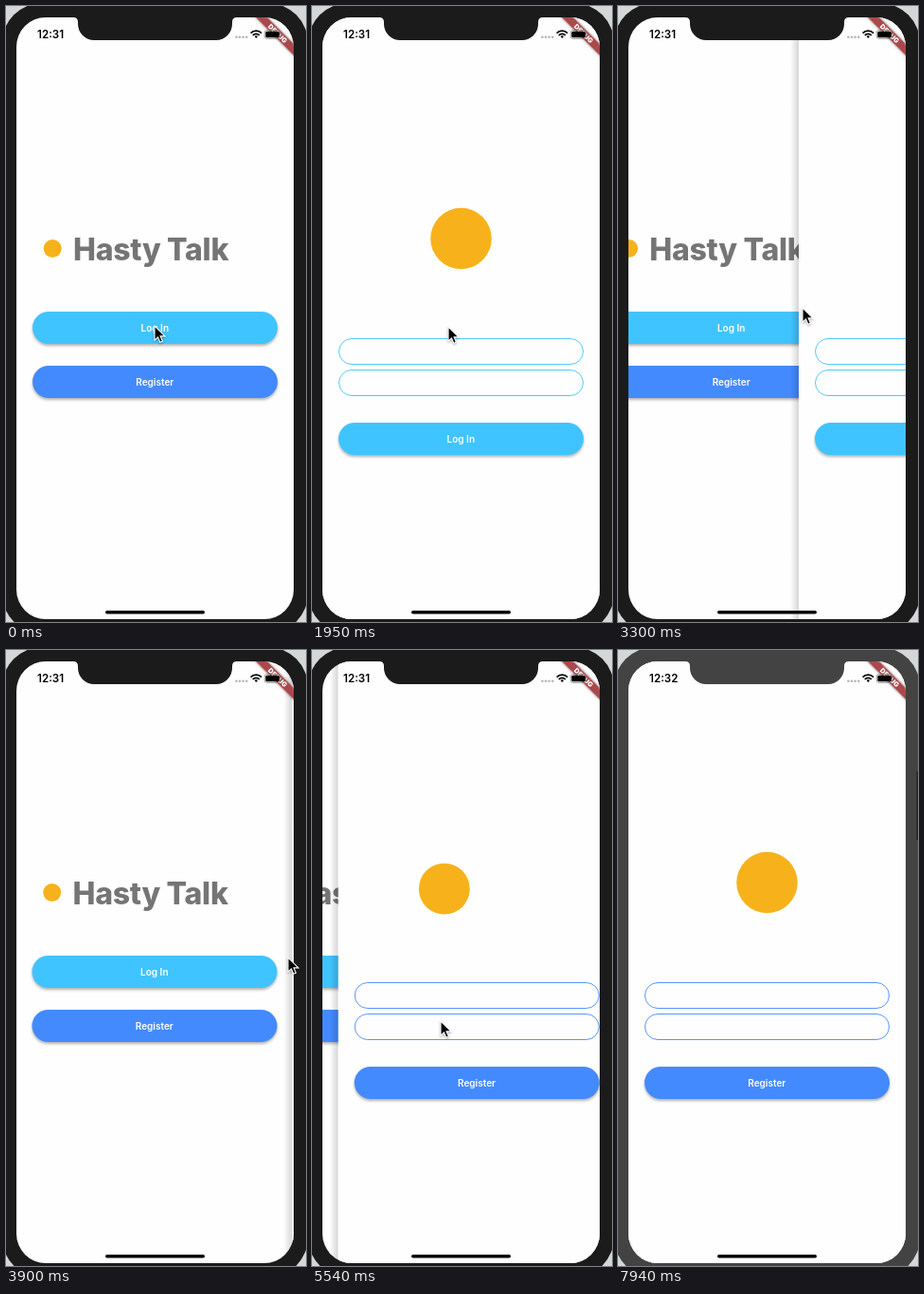
Write an HTML page that moves like this. It is 317x649 px and loops after 8040 ms.

```html
<!DOCTYPE html>
<html lang="en">
<head>
<meta charset="utf-8">
<title>Page transition</title>
<style>
  html, body { margin: 0; width: 100%; height: 100%; overflow: hidden; background: #d4d7d8; }
  svg { display: block; width: 100vw; height: 100vh; font-family: Inter, Roboto, sans-serif; }
  .label { font-size: 10px; font-weight: 600; fill: #fff; text-anchor: middle; }
  .raised { filter: drop-shadow(0 2px 1.6px rgba(0, 0, 0, .3)); }
  .logo { fill: #f7b21b; }
</style>
</head>
<body>
<svg viewBox="0 0 317 649">
  <defs>
    <clipPath id="screenClip"><rect x="11" y="12" width="293" height="634" rx="31"/></clipPath>
    <linearGradient id="edge">
      <stop offset="0" stop-color="#000" stop-opacity="0"/>
      <stop offset="1" stop-color="#000" stop-opacity=".16"/>
    </linearGradient>
  </defs>

  <rect id="body" x="-4" y="-3" width="323" height="664" rx="42"/>
  <rect id="sideKey" x="315.5" y="128" width="2" height="72" fill="#222"/>

  <g clip-path="url(#screenClip)">
    <rect x="11" y="12" width="293" height="634" fill="#fefefe"/>
    <g id="welcome">
      <circle id="smallLogo" class="logo"/>
      <text x="71" y="267.5" font-size="32" font-weight="800" letter-spacing="-.3" fill="#757575">Hasty Talk</text>
      <rect class="raised" x="28" y="322" width="259" height="34" rx="17" fill="#40c4ff"/>
      <rect class="raised" x="28" y="379" width="259" height="34" rx="17" fill="#448aff"/>
      <rect id="press" x="102" width="108" height="30" rx="3" fill="#bcbcbc"/>
      <text class="label" x="157.3" y="342.8">Log In</text>
      <text class="label" x="157.3" y="399.5">Register</text>
    </g>
    <g id="page">
      <rect id="pageShadow" x="2" y="12" width="9" height="634" fill="url(#edge)"/>
      <rect x="11" y="12" width="293" height="634" fill="#fefefe"/>
      <circle id="largeLogo" class="logo"/>
      <g id="fields" fill="none" stroke-width=".9">
        <rect x="28.5" y="350.5" width="258" height="27" rx="13.5"/>
        <rect x="28.5" y="383.5" width="258" height="27" rx="13.5"/>
      </g>
      <rect id="submit" class="raised" x="28" y="439" width="259" height="34" rx="17"/>
      <text id="submitLabel" class="label" x="157.3" y="459.5"></text>
    </g>
    <circle id="flyingLogo" class="logo"/>
    <g transform="translate(287 29) rotate(45)">
      <rect x="-40" y="-4.25" width="80" height="8.5" fill="#aa494c" style="filter:drop-shadow(0 0 1.5px rgba(0,0,0,.4))"/>
      <text y="2.6" font-size="7.2" font-weight="900" fill="#fff" text-anchor="middle">DEBUG</text>
    </g>
  </g>

  <path id="notch" d="M71 12q5 0 5 5v2a17 17 0 0 0 17 17H222a17 17 0 0 0 17-17v-2q0-5 5-5z"/>
  <text id="clock" x="33" y="34.2" font-size="11.6" font-weight="600"></text>
  <g fill="#b5b5b5">
    <circle cx="243.4" cy="32.8" r="1.3"/><circle cx="247" cy="32.8" r="1.3"/>
    <circle cx="250.6" cy="32.8" r="1.3"/><circle cx="254.2" cy="32.8" r="1.3"/>
  </g>
  <g fill="none" stroke="#000" stroke-width="1.8">
    <path d="M258.6 28.6a8 8 0 0 1 11.4 0M260.8 30.9a5 5 0 0 1 7 0"/>
    <path d="M262.6 32.1L264.3 34l1.7-1.9a2.6 2.6 0 0 0-3.4 0z" fill="#000" stroke="none"/>
  </g>
  <rect x="273.2" y="25.6" width="16.8" height="8.8" rx="2.5" fill="none" stroke="#777" stroke-width=".7"/>
  <rect x="274.3" y="26.7" width="14.6" height="6.6" rx="1.5"/>
  <path d="M290.8 28.6q1.4 1.4 0 2.8z" fill="#555"/>
  <rect x="105" y="637" width="105" height="3.6" rx="1.8"/>

  <path id="cursor" d="M0 0V15.2L3.5 11.9L5.8 17.3L8.4 16.2L6.1 10.9H11z" stroke="#fff" stroke-width="1.1"
        style="filter:drop-shadow(0 1px 1px rgba(0,0,0,.35))"/>
</svg>
<script>
const $ = id => document.getElementById(id);
const set = (id, attrs) => { for (const k in attrs) $(id).setAttribute(k, attrs[k]); };
const show = (id, on) => $(id).style.display = on ? '' : 'none';
const mix = (a, b, p) => a + (b - a) * p;

const LOOP = 8040, WIDTH = 293, PUSH = 400;
const LOGIN_AT = 1130, REGISTER_AT = 5318;

// [time, x, y] of the pointer tip; each place holds until the next
const pointer = [
  [0, 157, 337], [150, 156, 342], [300, 151, 355], [450, 148, 352], [600, 154, 339],
  [1950, 144, 338], [2100, 110, 330], [2250, 70, 323], [2400, 35, 321], [2550, 18, 323], [2700, 16, 324],
  [2850, 57, 324], [3000, 100, 321], [3150, 150, 319], [3300, 195, 318], [3450, 245, 319], [3600, 290, 322],
  [3750, 298, 324], [4050, 303, 324], [4200, 307, 324], [4500, 235, 350], [4650, 140, 377],
  [4790, 136, 388], [4940, 136, 391], [6440, 160, 430], [6590, 215, 560], [6740, 254, 640],
  [7190, 264, 643], [7340, 274, 642]
];
// [time, page offset] while the page is dragged back
const drag = [[2850, 2], [3000, 72], [3150, 132], [3300, 180], [3450, 232], [3600, 276],
  [3750, 288], [3900, 291.5], [4050, WIDTH]];
const held = (list, t) => list.filter(k => k[0] <= t).pop();

function bezier(x1, y1, x2, y2) {
  const at = (a, b, s) => 3 * (1 - s) ** 2 * s * a + 3 * (1 - s) * s * s * b + s ** 3;
  return x => {
    let lo = 0, hi = 1;
    for (let i = 0; i < 24; i++) {
      const mid = (lo + hi) / 2;
      if (at(x1, x2, mid) < x) lo = mid; else hi = mid;
    }
    return at(y1, y2, lo);
  };
}
const slideEase = bezier(.35, .91, .33, .97);
const flightEase = bezier(.4, 0, .2, 1);

// p = 0 is the small logo beside the title, p = 1 the large one on the form
function placeLogo(id, p) {
  set(id, {
    cx: mix(49.2, 157.5, p),
    cy: mix(255.5, 245, p) + 10 * Math.sin(Math.PI * p),
    r: .256 * mix(37, 126, p ** 1.5)
  });
}

const stepTime = t => {
  const start = t < 4790 ? 0 : 4790;
  return start + Math.floor((t - start) / 150) * 150;
};

function draw(t) {
  const registering = t >= 4500;
  const progress = Math.min(1, Math.max(0, (t - (registering ? REGISTER_AT : LOGIN_AT)) / PUSH));
  const flying = progress > 0 && progress < 1;
  const dragged = !registering && held(drag, t);
  const offset = dragged ? dragged[1] : WIDTH * (1 - slideEase(progress));
  const visible = progress > 0 && offset < WIDTH;

  show('page', visible);
  show('pageShadow', offset > .5);
  set('page', { transform: `translate(${offset} 0)` });
  set('welcome', { transform: `translate(${visible ? (offset - WIDTH) / 3 : 0} 0)` });

  const color = registering ? '#448aff' : '#40c4ff';
  set('fields', { stroke: color });
  set('submit', { fill: color });
  $('submitLabel').textContent = registering ? 'Register' : 'Log In';

  show('smallLogo', !flying);
  show('largeLogo', !flying);
  show('flyingLogo', flying);
  if (flying) placeLogo('flyingLogo', flightEase(progress));

  const sincePress = t - (registering ? 5240 : 1050);
  show('press', sincePress >= 0 && sincePress < 300);
  set('press', { y: registering ? 381 : 324, opacity: .22 });

  const [, x, y] = held(pointer, t);
  const inactive = t >= 7940;
  set('cursor', { transform: `translate(${x} ${y})` });
  show('cursor', !inactive);
  show('sideKey', inactive);
  for (const id of ['body', 'notch']) set(id, { fill: inactive ? '#434343' : '#1b1b1b' });
  $('clock').textContent = t >= 7640 ? '12:32' : '12:31';
}

placeLogo('smallLogo', 0);
placeLogo('largeLogo', 1);
const begin = performance.now();
function tick() {
  draw(stepTime((performance.now() - begin) % LOOP));
  requestAnimationFrame(tick);
}
tick();
</script>
</body>
</html>
```
